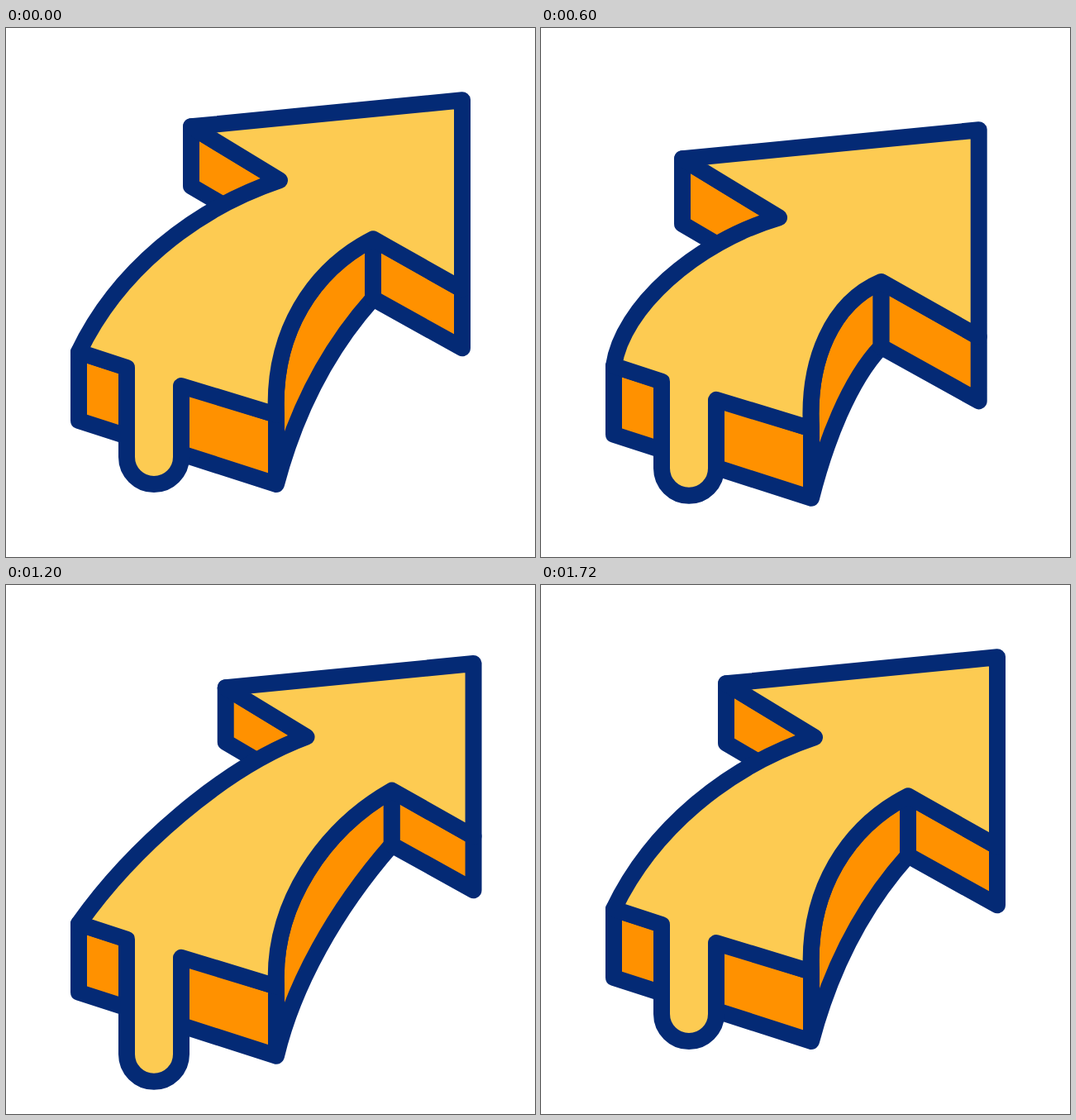
An HTML page that plays this animation: 640 px wide and 640 px high, repeating every 1760 ms.

```html
<!DOCTYPE html>
<html lang="en">
<head>
<meta charset="utf-8">
<title>Bouncing arrow</title>
<style>
  html, body { margin: 0; width: 100%; height: 100%; overflow: hidden; background: #fff; }
  svg { display: block; width: 100vw; height: 100vh; }
  path { stroke: #042a75; stroke-width: 20; stroke-linecap: round; stroke-linejoin: round; }
  .side { fill: #ff9100; }
  .top { fill: #fdcb52; }
</style>
</head>
<body>
<svg viewBox="0 0 640 640">
  <g id="arrow">
    <path class="side" id="barb"/>
    <path class="side" id="body"/>
    <path class="side" id="wing"/>
    <path class="top" id="face"/>
  </g>
</svg>
<script>
const LOOP = 1760, STEP = 40;
const $ = id => document.getElementById(id);

// head: scale, tip x, tip y; drip stretch; then curve handles as offsets:
// outer edge (2), inner edge (2), lower edge (2)
const REST  = [1, 552, 87.3, 0, 46, -96, -107, 36, -5, -100, -72, 37, 22, -83, -59, 66];
const SQUAT = [1.094, 529.6, 106.6, -3, 10, -70, -102, 30, -5, -83, -59, 25, 17, -67, -39, 41];
const REACH = [0.91, 566.2, 76.8, 32.5, 63, -88, -102, 38, -5, -100, -82, 47, 20, -85, -69, 79];

// cubic-bezier(a, 0, b, 1)
const bezier = (a, b) => x => {
  let lo = 0, hi = 1;
  for (let i = 0; i < 24; i++) {
    const u = (lo + hi) / 2, v = 1 - u;
    if (3 * v * v * u * a + 3 * v * u * u * b + u * u * u < x) lo = u;
    else hi = u;
  }
  return lo * lo * (3 - 2 * lo);
};
const soft = bezier(0.42, 0.58), firm = bezier(0.55, 0.33), snap = bezier(0.66, 0.33);

// time, values, easing towards them
const POSES = [[40, REST], [645, SQUAT, snap], [1080, REACH, snap], [1650, REST, snap]];
const SHIFT = [[40, [0]], [1000, [21.8], firm], [1670, [0], soft]];

function sample(keys, t) {
  if (t <= keys[0][0]) return keys[0][1];
  for (let i = 1; i < keys.length; i++) {
    const [t0, a] = keys[i - 1], [t1, b, ease] = keys[i];
    if (t < t1) {
      const k = ease((t - t0) / (t1 - t0));
      return a.map((v, j) => v + (b[j] - v) * k);
    }
  }
  return keys[keys.length - 1][1];
}

const add = (p, dx, dy) => [p[0] + dx, p[1] + dy];
const pt = p => p[0].toFixed(2) + ' ' + p[1].toFixed(2);
const line = (...ps) => 'L' + ps.map(pt).join(' ');
const curve = (...ps) => 'C' + ps.map(pt).join(' ');
const start = p => 'M' + pt(p);

const baseL = [88, 392], lowL = [88, 475], baseR = [327, 468], lowR = [327, 552];
const dripL = [146, 411], dripR = [212, 433];

function draw(t) {
  const [s, tx, ty, stretch, ...h] = sample(POSES, t);
  const head = (x, y) => [tx + (x - 552) * s, ty + (y - 87) * s];
  const handle = (p, i) => add(p, h[2 * i], h[2 * i + 1]);

  const tip = head(552, 87), barb = head(224, 119), barbLow = head(224, 191);
  const notch = head(331, 184), notchLow = head(331, 254);
  const inner = head(444, 255), innerLow = head(444, 327);
  const wing = head(552, 316), wingLow = head(552, 387);
  const dripY = 519 + stretch;

  $('barb').setAttribute('d', start(barb) + line(barbLow, notchLow, notch) + 'Z');
  $('wing').setAttribute('d', start(inner) + line(innerLow, wingLow, wing) + 'Z');
  $('body').setAttribute('d',
    start(baseL) + line(lowL, lowR, baseR) + 'Z' +
    start(lowR) + curve(handle(lowR, 4), handle(innerLow, 5), innerLow) + line(inner) +
    curve(handle(inner, 3), handle(baseR, 2), baseR) + 'Z');
  $('face').setAttribute('d',
    start(baseL) + curve(handle(baseL, 0), handle(notch, 1), notch) +
    line(barb, tip, wing, inner) +
    curve(handle(inner, 3), handle(baseR, 2), baseR) +
    line(dripR, [212, dripY]) + `A33 33 0 0 1 146 ${dripY}` + line(dripL) + 'Z');
  $('arrow').setAttribute('transform', `translate(0 ${sample(SHIFT, t)[0].toFixed(2)})`);
}

const began = performance.now();
function tick() {
  const t = (performance.now() - began) % LOOP;
  draw(Math.floor(t / STEP) * STEP);
  requestAnimationFrame(tick);
}
tick();
</script>
</body>
</html>
```
